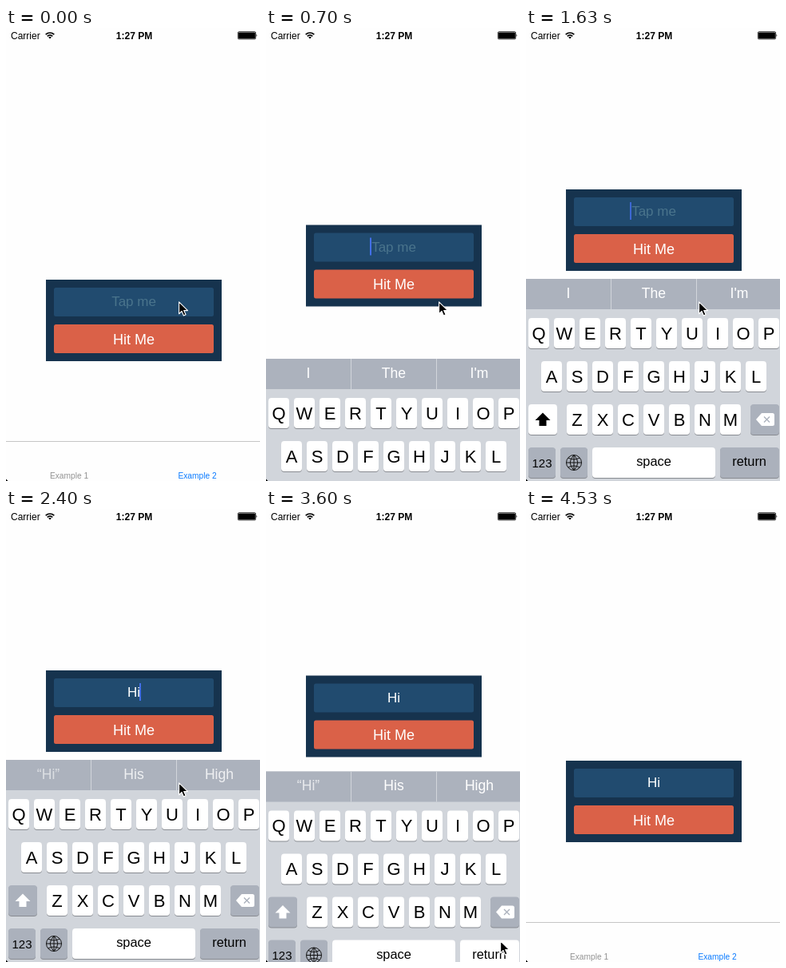
Animation of 318 by 567 pixels, one loop 5.63 s. Source, as an HTML page:

```html
<!DOCTYPE html>
<html lang="en">
<head>
<meta charset="utf-8">
<title>Keyboard avoiding form</title>
<style>
  html, body { margin: 0; width: 100%; height: 100%; overflow: hidden; background: #fefefe; }
  svg { display: block; width: 318px; height: 567px; }
  text { font-family: "Liberation Sans", Arial, sans-serif; text-anchor: middle; white-space: pre; }
  .letter { font-size: 22px; }
  .word { font-size: 16.4px; }
  .hint { font-size: 17.6px; fill: #fff; }
  .field { font-size: 17px; fill: #fff; }
  .tab { font-size: 10.2px; }
</style>
</head>
<body>
<svg viewBox="0 0 318 567">
  <rect width="318" height="567" fill="#fefefe"/>

  <g id="status">
    <text x="6" y="13.5" font-size="12" style="text-anchor:start">Carrier</text>
    <g fill="none" stroke="#000" stroke-width="1.7">
      <path d="M49.7 8.2A7.5 7.5 0 0 1 60.3 8.2"/>
      <path d="M51.8 10.3A4.5 4.5 0 0 1 58.2 10.3"/>
    </g>
    <path d="M53.2 11.7A2.5 2.5 0 0 1 56.8 11.7L55 13.5Z"/>
    <text x="160.5" y="13.5" font-size="12" font-weight="bold">1:27 PM</text>
    <rect x="290.4" y="4.7" width="22.2" height="9.2" rx="1.2" fill="none" stroke="#000" stroke-width=".8"/>
    <rect x="291.1" y="5.4" width="20.8" height="7.8" rx=".5"/>
    <path d="M313.5 7.5q1.8 1.8 0 3.6z"/>
  </g>

  <g id="tabs">
    <path d="M0 517.5H318" stroke="#c6c6c6"/>
    <text class="tab" x="79" y="563.7" fill="#929292">Example 1</text>
    <text class="tab" x="239.5" y="563.7" fill="#0b7bff">Example 2</text>
  </g>

  <g id="panel">
    <rect x="50" width="220" height="102" fill="#16334e"/>
    <rect x="60" y="10" width="200" height="36" rx="2.5" fill="#214b6f"/>
    <rect x="60" y="56" width="200" height="36" rx="2.5" fill="#da6148"/>
    <text id="entry" class="field" x="160" y="33.4"></text>
    <text x="160" y="80.7" font-size="18" fill="#fff">Hit Me</text>
    <rect id="caret" y="16" width="2" height="22" fill="#436fe8"/>
  </g>

  <g id="keyboard">
    <rect width="320" height="255" fill="#d1d5db"/>
    <rect width="320" height="38" fill="#acb2bd"/>
    <path d="M106.5 0V38M213.5 0V38" stroke="#d1d5db"/>
  </g>

  <path d="M0 564.5L2.5 567H0Z"/>
  <path id="pointer" d="M.6 .8V15.8L4 12.5 6.4 18 9.1 16.8 6.7 11.6H11.5Z"
        stroke="#fff" stroke-width="1.1" stroke-linejoin="round"/>
</svg>

<script>
const LOOP = 5630;
const GRAY = '#abb1bc';
const $ = id => document.getElementById(id);
const panel = $('panel'), keyboard = $('keyboard'), entry = $('entry'),
      caret = $('caret'), pointer = $('pointer');

function add(parent, tag, attrs, text) {
  const node = document.createElementNS('http://www.w3.org/2000/svg', tag);
  for (const name in attrs) node.setAttribute(name, attrs[name]);
  if (text) node.textContent = text;
  return parent.appendChild(node);
}

// Keyboard: each key is a cap with a one pixel shadow below it.
function addKey(x, y, width, fill = '#fff') {
  const box = { x, width, height: 38, rx: 4 };
  add(keyboard, 'rect', { ...box, y: y + 1, fill: '#888b91' });
  return add(keyboard, 'rect', { ...box, y, fill });
}
const label = (text, x, y, cls) => add(keyboard, 'text', { x, y, class: cls }, text);

[['QWERTYUIOP', 3, 49], ['ASDFGHJKL', 19, 103], ['ZXCVBNM', 51, 157]].forEach(([row, left, y]) =>
  [...row].forEach((letter, i) => {
    addKey(left + 32 * i, y, 26);
    label(letter, left + 32 * i + 13, y + 26.7, 'letter');
  }));

const shiftKey = addKey(3, 157, 36);
const shiftArrow = add(keyboard, 'path', { d: 'M21 167.5L30.5 177H25.5V184H16.5V177H11.5Z' });
addKey(281, 157, 36, GRAY);
add(keyboard, 'path', { d: 'M288 176L295 168H308.5Q311 168 311 170.5V181.5Q311 184 308.5 184H295Z', fill: '#fff' });
add(keyboard, 'path', { d: 'M298 172.5L305 179.5M305 172.5L298 179.5', stroke: GRAY, 'stroke-width': 1.4 });
addKey(3, 211, 34, GRAY);
label('123', 20, 235.5, 'word').style.fontSize = '15px';
addKey(43, 211, 34, GRAY);
add(keyboard, 'path', {
  d: 'M50.5 230a9.5 9.5 0 1 0 19 0a9.5 9.5 0 1 0-19 0H69.5M60 220.5V239.5' +
     'M60 220.5Q50.5 230 60 239.5Q69.5 230 60 220.5M53 224Q60 228 67 224M53 236Q60 232 67 236',
  fill: 'none', stroke: '#111'
});
addKey(83, 211, 154);
label('space', 160, 234.3, 'word');
const returnKey = addKey(243, 211, 74, GRAY);
label('return', 279.6, 234.3, 'word');

const hints = [['I', 'The', "I'm"], ['“H”', 'He', 'Have'], ['“Hi”', 'His', 'High']].map((words, set) => {
  const group = add(keyboard, 'g', {});
  words.forEach((word, i) => add(group, 'text', {
    x: 53 + 107 * i, y: 23.8, class: 'hint', opacity: set && !i ? .72 : 1
  }, word));
  return group;
});

// Tracks are rows of [time, value, ...], linear between rows.
function sample(track, t, ease = k => k) {
  const next = track.findIndex(row => row[0] > t);
  if (next < 0) return track[track.length - 1].slice(1);
  if (next === 0) return track[0].slice(1);
  const a = track[next - 1], b = track[next];
  const k = ease((t - a[0]) / (b[0] - a[0]));
  return a.slice(1).map((v, i) => v + (b[i + 1] - v) * k);
}
const smooth = k => k * k * (3 - 2 * k);

const pointerPath = [
  [2400, 216, 342], [2960, 307, 533], [3250, 293, 540], [4300, 293, 540], [4530, 284, 570]
];
const caretFade = [
  [1100, 1], [1270, 0], [1530, 0], [1650, 1], [1870, 1],
  [2610, 1], [2730, 0], [3060, 0], [3180, 1]
];
const hintFades = [
  [[1840, 1], [2020, 0]],
  [[1840, 0], [2020, 1], [2150, 1], [2340, 0]],
  [[2150, 0], [2460, 1]]
];

// The picture holds still between bursts of evenly spaced steps.
const stepTimes = [
  [590, 1050, 9], [1160, 1280, 3], [1630, 1690, 2], [1870, 2400, 10], [2450, 2960, 10],
  [3020, 3250, 5], [3490, 3770, 6], [3830, 4000, 3], [4060, 4120, 2], [4360, 4530, 4]
].flatMap(([from, to, n]) => Array.from({ length: n }, (_, i) => from + (to - from) * i / (n - 1)));
const snap = t => stepTimes.reduce((last, step) => step <= t + .01 ? step : last, 0);

// Critically damped slide from 0 to 1.
function spring(ms) {
  const x = Math.max(0, ms) * .016;
  const p = 1 - (1 + x) * Math.exp(-x);
  return p > .995 ? 1 : p;
}

const halfPixel = v => Math.round(v * 2) / 2;
const move = (node, x, y) => node.setAttribute('transform', `translate(${x} ${y})`);

function render(time) {
  const t = snap(time);
  const raised = spring(t - 520) - spring(t - 3522);
  move(panel, 0, halfPixel(315 - 113 * raised));
  move(keyboard, 0, halfPixel(567 - 253 * raised));
  keyboard.style.visibility = raised > 0 ? 'visible' : 'hidden';

  const typed = t < 1870 ? '' : t < 2100 ? 'H' : 'Hi';
  entry.textContent = typed || 'Tap me';
  entry.style.fill = typed ? '#fff' : '#4a748c';
  caret.setAttribute('x', typed ? 167 : 130);
  caret.setAttribute('opacity', t >= 590 && t < 3540 ? sample(caretFade, t)[0] : 0);

  shiftKey.setAttribute('fill', typed ? GRAY : '#fff');
  shiftArrow.setAttribute('fill', typed ? '#fff' : '#000');
  returnKey.setAttribute('fill', t >= 3490 ? '#fff' : GRAY);
  hints.forEach((group, i) => group.setAttribute('opacity', sample(hintFades[i], t)[0]));
  move(pointer, ...sample(pointerPath, t, smooth));
}

const start = performance.now();
function frame() {
  render((performance.now() - start) % LOOP);
  requestAnimationFrame(frame);
}
frame();
</script>
</body>
</html>
```
